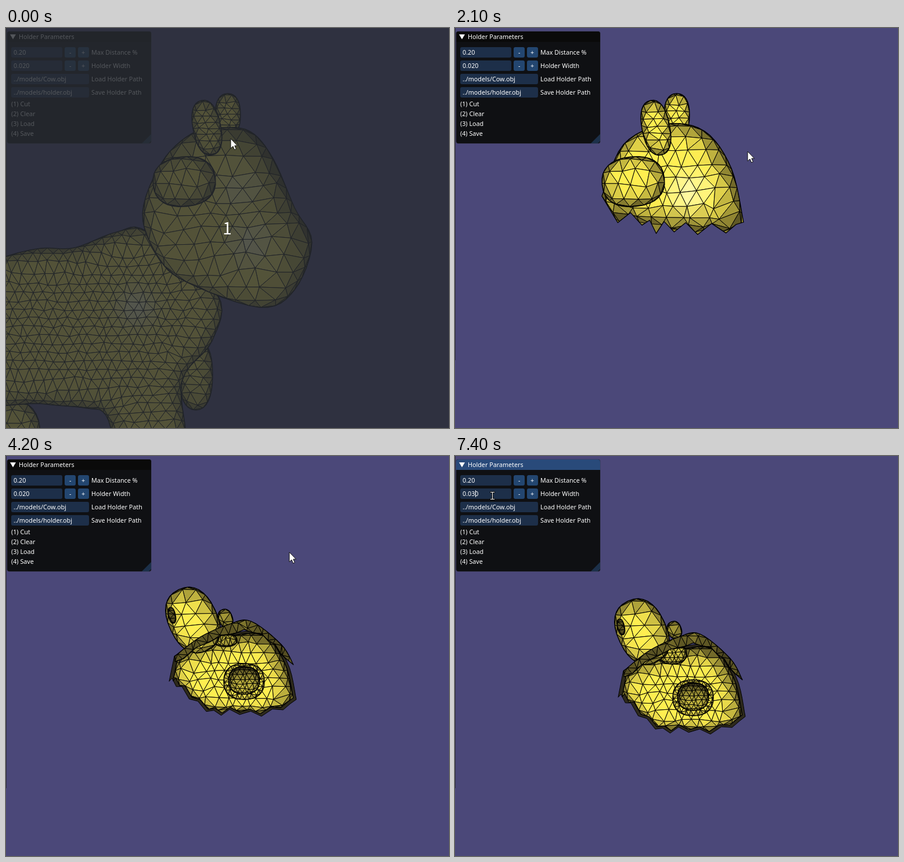
These frames come from a looping animation (763x690 px, 8 s). An HTML page with a canvas:

```html
<!DOCTYPE html>
<html lang="en">
<head>
<meta charset="utf-8">
<title>Holder Parameters</title>
<style>
html, body { margin: 0; width: 100%; height: 100%; overflow: hidden; background: #4b4879; }
canvas { display: block; }
</style>
</head>
<body>
<canvas id="stage" width="763" height="690"></canvas>
<script>
const ctx = document.getElementById('stage').getContext('2d');
const LOOP = 8000, TICK = 100, CUT = 2100, EDIT = 6100;

const lerp = (a, b, k) => a + (b - a) * k;
const clamp = v => Math.max(0, Math.min(1, v));
const noise = (i, j) => { const s = Math.sin(i * 12.99 + j * 78.23) * 43758.5; return s - Math.floor(s) - 0.5; };

// ---- Motion: each move runs from the place before it to x, y and a pose.
const moves = [
  { from: 600, to: 600, x: 384, y: 190, pose: 0 },
  { from: 1700, to: 1700, x: 456, y: 205, pose: 0 },
  { from: 1800, to: 1800, x: 504, y: 213, pose: 0 },
  { from: 2400, to: 2700, x: 544, y: 359, pose: 1 },
  { from: 2900, to: 3000, x: 551, y: 383, pose: 1 },
  { from: 3200, to: 3200, x: 567, y: 504, pose: 1 },
  { from: 3300, to: 3700, x: 497, y: 262, pose: 2 },
  { from: 4000, to: 4200, x: 488, y: 166, pose: 3 },
  { from: 4300, to: 4500, x: 484, y: 123, pose: 3.97 },
  { from: 4900, to: 4900, x: 484, y: 122, pose: 4 },
  { from: 5100, to: 5100, x: 458, y: 135, pose: 4 },
  { from: 5300, to: 5800, x: 58, y: 64, pose: 4 },
  { from: EDIT, to: EDIT, x: 64, y: 68, pose: 4 }
];

function stateAt(t) {
  const now = { x: 387, y: 191, pose: 0 };
  for (const move of moves) {
    const k = clamp((t - move.from + TICK) / (move.to - move.from + TICK));
    for (const key in now) now[key] = lerp(now[key], move[key], k);
  }
  return now;
}

// ---- Curves
function spline(flat, closed, steps = 6) {
  const pts = [], out = [];
  for (let i = 0; i < flat.length; i += 2) pts.push([flat[i], flat[i + 1]]);
  const n = pts.length;
  const at = i => pts[closed ? (i + n) % n : Math.max(0, Math.min(n - 1, i))];
  for (let i = 0; i < (closed ? n : n - 1); i++) {
    const [a, b, c, d] = [at(i - 1), at(i), at(i + 1), at(i + 2)];
    for (let s = 0; s < 1; s += 1 / steps) {
      out.push([0, 1].map(k => b[k] + 0.5 * s * (c[k] - a[k] + s * (2 * a[k] - 5 * b[k] + 4 * c[k] - d[k]
        + s * (3 * (b[k] - c[k]) + d[k] - a[k])))));
    }
  }
  if (!closed) out.push(at(n - 1));
  return out;
}

// A slightly squared ellipse, tilted in degrees.
function oval([x, y, rx, ry, tilt = 0]) {
  const c = Math.cos(tilt * Math.PI / 180), s = Math.sin(tilt * Math.PI / 180);
  const bulge = v => Math.sign(v) * Math.abs(v) ** 0.85;
  return Array.from({ length: 32 }, (_, i) => {
    const u = rx * bulge(Math.cos(i * Math.PI / 16)), v = ry * bulge(Math.sin(i * Math.PI / 16));
    return [x + u * c - v * s, y + u * s + v * c];
  });
}

// A smooth crown closed by a hem of torn triangles.
function torn({ crown, hem }, depth) {
  const teeth = spline(hem, false, 3).map(([x, y], i) => [x, y + depth * ((i % 2 ? 1 : -1) + noise(i, 3))]);
  return [...spline(crown, false), ...teeth];
}

// ---- Shapes
const cow = {
  body: spline([-60,420, 0,394, 60,380, 118,379, 190,352, 245,352, 364,458, 355,540, 303,610, 306,740,
    205,740, 172,668, 140,656, 60,648, -60,630], true),
  head: spline([318,183, 268,232, 235,320, 262,395, 310,438, 437,482, 497,452, 527,370, 497,310,
    460,225, 420,178, 365,172], true),
  farLeg: oval([327, 598, 29, 61]),
  hindLeg: oval([10, 702, 49, 60])
};

const turned = v => Array.isArray(v) ? v.map((n, i) => i % 2 ? n + 19 + (n - 230) * 0.055 : n)
  : { crown: turned(v.crown), hem: turned(v.hem) };
const lowered = ([x, y, ...size], dy) => [x, y + dy, ...size];

const shell = [
  { crown: [253,290, 290,201, 362,166, 430,178, 476,242, 497,335], hem: [484,350, 418,345, 360,345, 322,334, 265,320] },
  { crown: [280,318, 335,298, 372,262, 400,239, 445,262, 498,362], hem: [492,358, 460,310, 412,291, 370,297, 284,328] },
  { crown: [291,345, 335,312, 385,290, 422,285, 474,325, 495,360], hem: [482,352, 452,316, 410,302, 350,320, 291,357] }
];
const under = [
  { crown: [280,318, 330,312, 410,290, 470,318, 498,368], hem: [490,368, 450,368, 412,346, 368,366, 310,345, 277,340] },
  { crown: [290,345, 345,318, 440,303, 484,355, 500,420], hem: [490,432, 440,444, 385,442, 345,438, 303,402, 281,385] }
];
const eyeLow = [322, 283, 42, 58, -25], holeLow = [410, 387, 27, 24, 0];

// Poses: upright, leaning forward, tilted back, seen from below, fully turned.
const poses = {
  backEar: [[382,150,22,37,0], [383,150,26,38,0], [368,222,22,29,-20], [378,280,12,16,-20], [378,300,12,15,-20]],
  frontEar: [[346,172,24,48,-11], [343,172,30,47,-5], [328,260,15,20,0], [328,290,15,20,0], [328,310,15,20,0]],
  eye: [[307,265,54,43,-6], [307,265,64,53,-5], [322,258,48,66,-25], eyeLow, lowered(eyeLow, 20)],
  shell: [shell[0], shell[0], shell[1], shell[2], turned(shell[2])],
  under: [under[0], under[0], under[0], under[1], turned(under[1])],
  earHole: [holeLow, holeLow, lowered(holeLow, -67), holeLow, lowered(holeLow, 28)],
  farHole: [[376,306,12,6,0], [376,306,12,6,0], [376,306,12,6,0], [378,318,20,11,0], [374,341,25,18,0]]
};

function mix(a, b, k) {
  if (Array.isArray(a)) return a.map((v, i) => lerp(v, b[i], k));
  return { crown: mix(a.crown, b.crown, k), hem: mix(a.hem, b.hem, k) };
}

function poseOf(name, p) {
  const i = Math.min(3, Math.floor(p));
  return mix(poses[name][i], poses[name][i + 1], p - i);
}

// ---- Mesh
function trace(pts) {
  ctx.beginPath();
  pts.forEach(([x, y]) => ctx.lineTo(x, y));
  ctx.closePath();
}

// Nearest point of a closed edge, its distance, and whether x, y lies inside.
function nearest(edge, x, y) {
  let best = { d: Infinity }, inside = false;
  edge.forEach(([px, py], i) => {
    const [qx, qy] = edge[(i + 1) % edge.length], ex = qx - px, ey = qy - py;
    const k = clamp(((x - px) * ex + (y - py) * ey) / (ex * ex + ey * ey || 1));
    const ax = px + ex * k, ay = py + ey * k, d = Math.hypot(x - ax, y - ay);
    if (d < best.d) best = { d, x: ax, y: ay };
    if (py > y !== qy > y && x < px + ex * (y - py) / ey) inside = !inside;
  });
  return { ...best, inside };
}

function tone(light, shine) {
  const k = clamp(light);
  return `rgb(${lerp(52, 255, k)},${lerp(47, 238, k) + shine * 16},${lerp(25, 80, k) + shine * 120})`;
}

// An even lattice laid over a shape whose border curves away over the given radius.
function relief(edge, cell, { radius = 40, gain = 1.12, lx = 0, ly = 0, shine = [] } = {}) {
  const xs = edge.map(p => p[0]), ys = edge.map(p => p[1]);
  const left = Math.min(...xs) - cell * 2, top = Math.min(...ys) - cell * 2;
  const rowHeight = cell * 0.866;
  const rows = Math.ceil((Math.max(...ys) - top) / rowHeight) + 2;
  const cols = Math.ceil((Math.max(...xs) - left) / cell) + 2;

  function vertex(i, j) {
    const x = left + (i + (j % 2) / 2 + noise(i, j) * 0.35) * cell;
    const y = top + (j + noise(j + 40, i) * 0.35) * rowHeight;
    const near = nearest(edge, x, y), d = near.inside ? near.d : 0;
    const slope = Math.min(1, d / radius) * Math.PI / 2;
    const pull = d && d < radius ? radius * (1 - Math.cos(slope)) / d : d ? 1 : 0;
    const ox = d ? (near.x - x) / d : 0, oy = d ? (near.y - y) / d : 0;
    const at = [lerp(near.x, x, pull), lerp(near.y, y, pull)];
    return {
      at, inside: near.inside,
      light: gain * (0.9 * Math.sin(slope) + (ox * lx + oy * ly) * Math.cos(slope)) + 0.12,
      shine: shine.reduce((sum, [sx, sy, r]) => sum + Math.exp(-((at[0] - sx) ** 2 + (at[1] - sy) ** 2) / r ** 2), 0)
    };
  }

  const grid = Array.from({ length: rows }, (_, j) => Array.from({ length: cols }, (_, i) => vertex(i, j)));
  const mean = (vs, key) => vs.reduce((sum, v) => sum + v[key], 0) / 3;
  function facet(...vs) {
    if (!vs.some(v => v.inside)) return;
    trace(vs.map(v => v.at));
    ctx.fillStyle = tone(mean(vs, 'light'), Math.min(1, mean(vs, 'shine')));
    ctx.fill();
    ctx.stroke();
  }

  ctx.save();
  ctx.strokeStyle = '#000';
  ctx.lineWidth = 1;
  trace(edge);
  ctx.fillStyle = tone(gain * 0.4, 0);
  ctx.fill();
  ctx.clip();
  for (let j = 0; j < rows - 1; j++) {
    for (let i = 0; i < cols - 1; i++) {
      const a = grid[j][i], b = grid[j][i + 1], c = grid[j + 1][i], d = grid[j + 1][i + 1];
      if (j % 2) { facet(a, b, d); facet(a, d, c); } else { facet(a, b, c); facet(b, d, c); }
    }
  }
  ctx.restore();
  trace(edge);
  ctx.strokeStyle = '#000';
  ctx.lineWidth = 1.3;
  ctx.stroke();
}

// A cut surface with its dark thickness showing around it.
function thick(edge, cell, options) {
  const mid = [0, 1].map(k => edge.reduce((sum, p) => sum + p[k], 0) / edge.length);
  const inner = edge.map(p => [0, 1].map(k => lerp(p[k], mid[k], 0.055)));
  trace(edge);
  ctx.fillStyle = '#2e2a1c';
  ctx.fill();
  ctx.strokeStyle = '#000';
  ctx.lineWidth = 1;
  ctx.stroke();
  relief(inner, cell, options);
}

function drawCow() {
  relief(cow.farLeg, 16, { radius: 26, gain: 0.95 });
  relief(cow.hindLeg, 17, { radius: 40 });
  relief(cow.body, 17, { radius: 52, shine: [[225, 482, 30]] });
  relief(oval(poses.backEar[0]), 11, { radius: 20 });
  relief(cow.head, 26, { radius: 78, lx: -0.2, ly: 0.15, shine: [[402, 282, 24], [422, 372, 30]] });
  relief(oval(poses.frontEar[0]), 12, { radius: 22 });
  relief(oval(poses.eye[0]), 20, { radius: 42, lx: -0.15, ly: -0.1 });
}

function drawHolder(p) {
  const part = name => poseOf(name, p), turn = clamp(p - 1), facingUp = p < 1.4;
  const drawShell = () => relief(torn(part('shell'), lerp(9, 2, turn)), lerp(23, 15, turn),
    { radius: lerp(60, 22, turn), gain: lerp(1.12, 0.68, turn), lx: -0.15, shine: facingUp ? [[402, 282, 28]] : [] });
  const drawEye = () => relief(oval(part('eye')), 20, { radius: 42, lx: -0.1, ly: lerp(-0.1, 0.05, turn) });

  relief(oval(part('backEar')), 13, { radius: 20 });
  if (facingUp) {
    drawShell();
    relief(oval(part('frontEar')), 14, { radius: 25 });
    if (p > 0) relief(oval([341, 132, 9 * p, 5]), 6, { radius: 9, gain: 0.15 });
    drawEye();
    return;
  }
  thick(torn(part('under'), 4), 16, { radius: 38, gain: 1.05, lx: -0.15, ly: 0.3 });
  const hole = part('earHole'), [x, y, rx, ry] = hole;
  relief(oval(part('farHole')), 7, { radius: 16, gain: 0.8 });
  relief(oval([x, y + 2, rx * 1.3, ry * 1.3]), 8, { radius: 8 });
  relief(oval(hole), 7, { radius: 22, gain: 0.55, ly: 0.7 });
  drawEye();
  const [ex, ey, ew, eh] = part('eye');
  relief(oval([ex - ew * 0.86, ey - eh * 0.14, 6, 14, -12]), 8, { radius: 12, gain: 0.25 });
  drawShell();
}

// ---- Interface
function box(x, y, w, h, r, fill) {
  ctx.beginPath();
  ctx.roundRect(x, y, w, h, r);
  ctx.fillStyle = fill;
  ctx.fill();
}

function fillShape(pts, fill) {
  trace(pts);
  ctx.fillStyle = fill;
  ctx.fill();
}

function label(text, x, y) {
  ctx.fillStyle = '#fff';
  ctx.fillText(text, x, y);
}

function drawPanel(t) {
  const editing = t >= EDIT;
  const width = t < 7000 ? '0.020' : t < 7400 ? '0.00' : '0.030';
  box(1.5, 5.5, 249, 194, 4, '#3b3a55');
  box(2, 6, 248, 193, 4, '#0f1013');
  box(2, 6, 248, 18, [4, 4, 0, 0], editing ? '#294a7a' : '#0a0a0a');
  fillShape([[7, 11], [17, 11], [12, 19.5]], '#fff');
  fillShape([[250, 183], [250, 195], [246, 199], [234, 199]], '#1c304a');

  ctx.font = '10.75px "Noto Sans", "Open Sans", sans-serif';
  ctx.textAlign = 'left';
  label('Holder Parameters', 22, 19);
  [['0.20', 'Max Distance %'], [width, 'Holder Width']].forEach(([value, name], i) => {
    const y = 33 + i * 23;
    box(9, y, 88, 18, 3, '#1d2f49');
    box(101, y, 19, 18, 3, '#234670');
    box(124, y, 19, 18, 3, '#234670');
    if (i && editing && t < 7000) box(12, 58, 30, 14, 0, '#2a5282');
    label(value, 13, y + 13);
    label('-', 109, y + 13);
    label('+', 130, y + 13);
    label(name, 147, y + 13);
  });
  [['../models/Cow.obj', 'Load Holder Path'], ['../models/holder.obj', 'Save Holder Path']].forEach(([path, name], i) => {
    const y = 79 + i * 23;
    box(9, y, 134, 18, 3, '#1d2f49');
    label(path, 13, y + 13);
    label(name, 147, y + 13);
  });
  ['Cut', 'Clear', 'Load', 'Save'].forEach((name, i) => label(`(${i + 1}) ${name}`, 9, 135 + i * 17));
  if (t >= 7000) box(t < 7400 ? 28 : 35, 59, 1, 12, 0, '#fff');
}

function drawArrow(x, y) {
  fillShape([[0, 0], [0, 16.5], [4, 13], [6.5, 19], [9.3, 17.8], [6.8, 12], [11.5, 12]]
    .map(([a, b]) => [x + a, y + b]), '#fff');
  ctx.lineWidth = 1;
  ctx.strokeStyle = '#111';
  ctx.stroke();
}

function drawBeam(x, y) {
  box(x - 4, y - 7, 9, 3, 1, '#111');
  box(x - 4, y + 5, 9, 3, 1, '#111');
  box(x - 1, y - 6, 3, 13, 0, '#111');
  box(x - 3, y - 6, 7, 1, 0, '#fff');
  box(x - 3, y + 6, 7, 1, 0, '#fff');
  box(x, y - 6, 1, 13, 0, '#fff');
}

function drawIntro() {
  ctx.fillStyle = 'rgba(40,44,50,.8)';
  ctx.fillRect(0, 0, 763, 690);
  ctx.font = '28px "Noto Sans CJK SC", "Noto Sans CJK JP", sans-serif';
  ctx.textAlign = 'center';
  label('1', 381, 356);
}

function draw(t) {
  const { x, y, pose } = stateAt(t);
  ctx.lineJoin = 'round';
  box(0, 0, 763, 690, 0, '#4b4879');
  box(0, 0, 1, 573, 0, '#2c2b3c');
  if (t < CUT) drawCow(); else drawHolder(pose);
  drawPanel(t);
  if (t < TICK) drawIntro();
  if (t >= 5800) drawBeam(x, y); else drawArrow(x, y);
}

let shown = -1;
const start = performance.now();
function run() {
  const tick = Math.floor((performance.now() - start) % LOOP / TICK);
  if (tick !== shown) draw((shown = tick) * TICK);
  requestAnimationFrame(run);
}
run();
</script>
</body>
</html>
```
